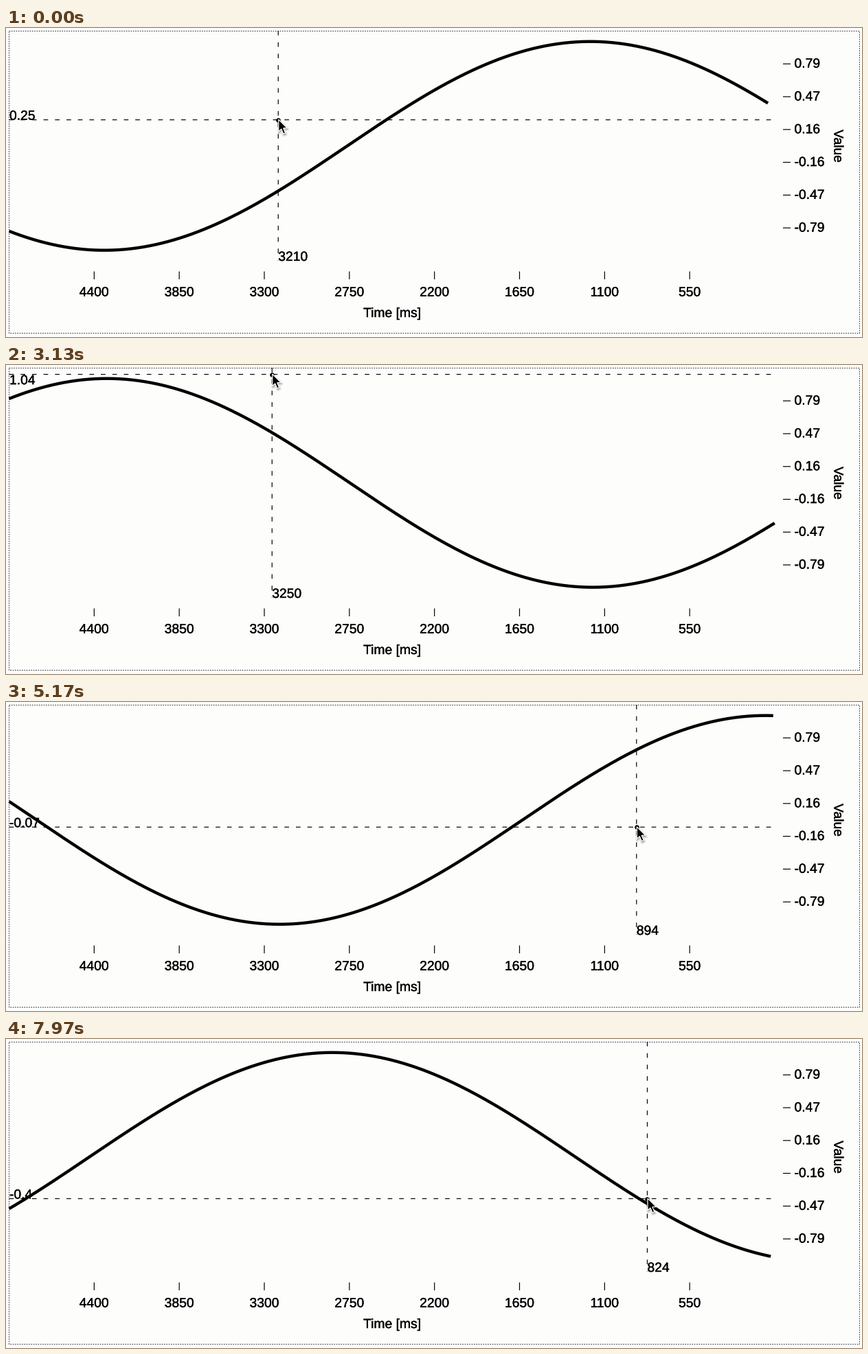
A matplotlib script for the animation above (8 s loop, 1246 px wide and 450 px high).

```python
import numpy as np
import matplotlib.pyplot as plt
from matplotlib.animation import FuncAnimation
from matplotlib.patches import Polygon
from matplotlib.patheffects import withStroke

W, H, DPI = 1246, 450, 100
PX = 72 / DPI
FRAMES, STEP = 320, 25

LEFT, RIGHT, TOP, BOTTOM = 4.5, 1119, 4, 338.5
MID, UNIT = 171.7, 152
SPAN, LIMIT = 4950, 1.1
PERIOD = 2000 * np.pi
CREST = 1193        # age in ms of the wave's crest as the loop begins
SAMPLING = 48       # ms between samples
DASH = (6.7, 10)

# where the pointer rests: time, age in ms, value
STOPS = [
    (0, 3210, 0.25),
    (1925, 3547, 0.61),
    (3125, 3250, 1.04),
    (4525, 47, -0.38),
    (5825, 1844, 0.28),
    (7025, 1834, 0.19),
    (7950, 824, -0.4),
]

plt.rcParams.update({
    "font.family": "Liberation Sans",
    "font.size": 19.3 * PX,
    "lines.scale_dashes": False,
    "lines.dash_capstyle": "butt",
    "lines.solid_capstyle": "butt",
})

fig = plt.figure(figsize=(W / DPI, H / DPI), dpi=DPI, facecolor="#fdfdfc")
ax = fig.add_axes([0, 0, 1, 1])
ax.set(xlim=(0, W), ylim=(H, 0))
ax.axis("off")


def to_x(age):
    return RIGHT - age * (RIGHT - LEFT) / SPAN


def to_y(value):
    return MID - value * UNIT


def line(xs=(), ys=(), width=1.2, color="black", dash=None, **kw):
    style = (0, [d * PX for d in dash]) if dash else "-"
    return ax.plot(xs, ys, color=color, lw=width * PX, ls=style,
                   snap=False, **kw)[0]


def label(x, y, s="", ha="left", va="baseline", **kw):
    heavier = [withStroke(linewidth=0.35 * PX, foreground="black")]
    return ax.text(x, y, s, ha=ha, va=va, path_effects=heavier, **kw)


def cursor_shape():
    """Arrow with its tip at the origin, mirrored about a tilted axis."""
    half = np.array([(16.2, 6.7), (14.3, 1.6), (21.9, 1.6)])
    along, across = np.vstack([(0, 0), half, half[::-1] * (1, -1)]).T
    c, s = np.cos(np.pi / 8), np.sin(np.pi / 8)
    return np.column_stack([along * s - across * c, along * c + across * s])


# border and axes
line([4.5, 1242.5, 1242.5, 4.5, 4.5], [4.5, 4.5, 444.5, 444.5, 4.5],
     1, "#333344", (1.67, 1.67))
for age in range(550, SPAN, 550):
    x = to_x(age)
    line([x, x], [354.5, 366])
    label(x, 390.5, str(age), "center")
for n in range(-5, 6, 2):
    value = LIMIT * n / 7
    y = to_y(value)
    line([1131, 1142], [y, y])
    label(1147.5, y + 5.5, f"{value:.2f}")
label(562, 421, "Time [ms]", "center")
label(1210, 172, "Value", "center", "center", rotation=-90)

# moving parts
curve = line(width=4.4)
v_line = line(dash=DASH)
h_line = line(dash=DASH)
dot = line(marker="o", ms=6.6 * PX, mew=0)
time_text = label(0, 339)
value_text = label(LEFT + 0.5, 0)

ARROW = cursor_shape()
shadows = [ax.add_patch(Polygon(ARROW, fc="black", ec="black", alpha=0.07,
                                lw=w * PX, joinstyle="round", zorder=5))
           for w in (5, 3, 1)]
arrow = ax.add_patch(Polygon(ARROW, fc="black", ec="white", lw=1.2 * PX,
                             zorder=6))


def pointer(t):
    """Ease from one stop to the next."""
    for (t0, *p), (t1, *q) in zip(STOPS, STOPS[1:]):
        if t < t1:
            break
    u = min((t - t0) / (t1 - t0), 1)
    u *= u * (3 - 2 * u)
    return [a + (b - a) * u for a, b in zip(p, q)]


def draw(k):
    t = k * STEP
    newest = (t + 44) % SAMPLING
    ages = np.linspace(SPAN, newest, 250)
    wave = np.cos(2 * np.pi * (ages - CREST - t) / PERIOD)
    curve.set_data(to_x(ages), to_y(wave))

    age, value = pointer(t)
    x, y = to_x(age), to_y(value)
    v_line.set_data([x, x], [TOP, BOTTOM])
    h_line.set_data([LEFT, RIGHT], [y, y])
    dot.set_data([x], [y])

    # labels flip inward near the edges
    time_text.set_text(f"{age:.0f}")
    time_text.set_x(x)
    time_text.set_ha("right" if x > RIGHT - 50 else "left")
    value_text.set_text(f"{round(value, 2) + 0:g}")
    value_text.set_y(y + 14.5 if y < 24 else y)

    tip = np.array([x + 0.5, y - 0.5])
    arrow.set_xy(ARROW + tip)
    for shadow in shadows:
        shadow.set_xy(ARROW + tip + (0.8, 2))


anim = FuncAnimation(fig, draw, frames=FRAMES, interval=STEP,
                     init_func=lambda: draw(0), repeat=True, repeat_delay=0,
                     blit=False)
plt.show()
```
